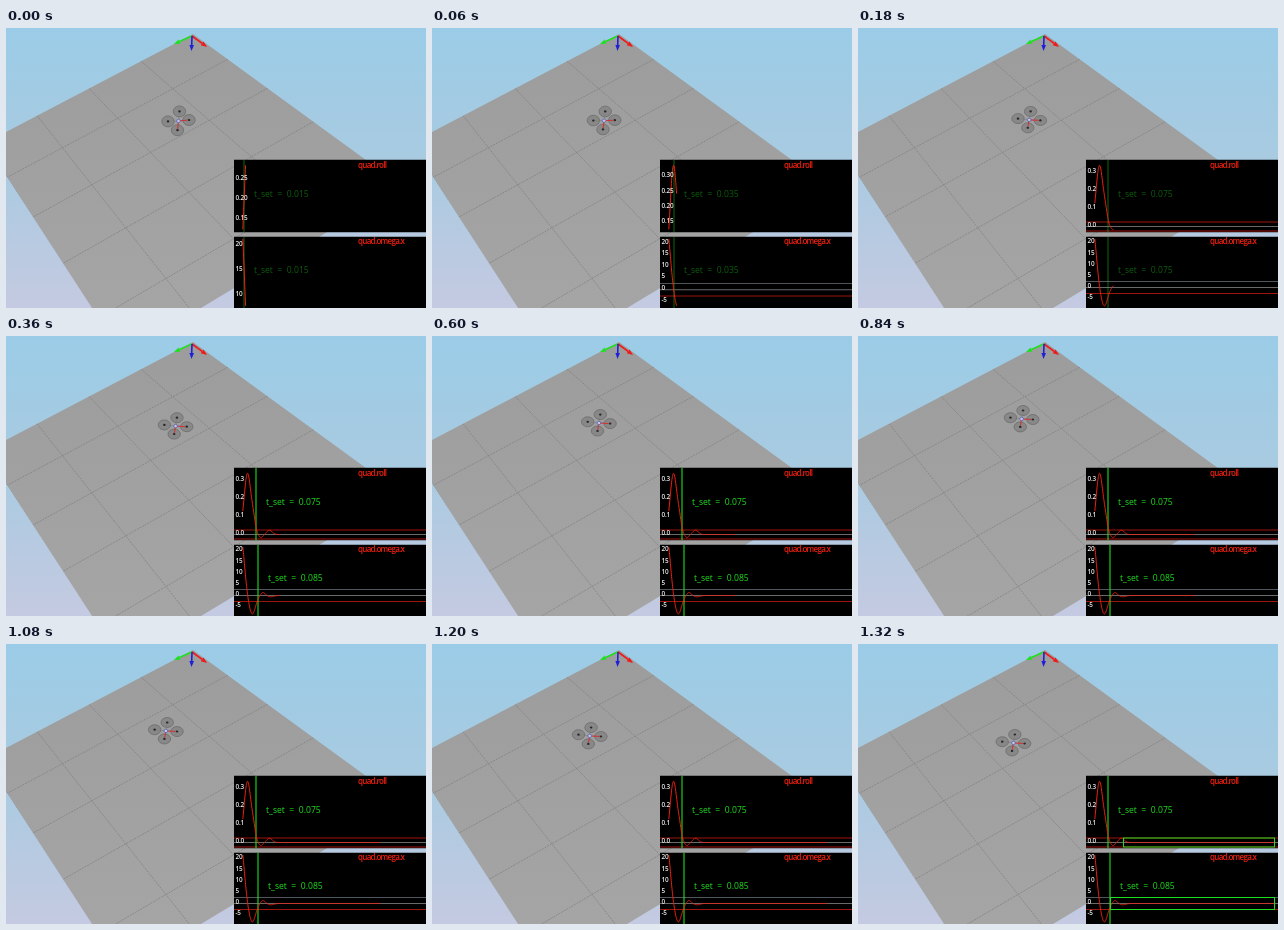
These frames come from a looping animation (420 by 280 pixels, 1.38 s). An HTML page with a canvas:

```html
<!DOCTYPE html>
<html lang="en">
<head>
<meta charset="utf-8">
<title>Quadcopter step response</title>
<style>
html, body { margin: 0; width: 100%; height: 100%; overflow: hidden; background: #a9cde2; }
canvas { display: block; width: 420px; height: 280px; }
</style>
</head>
<body>
<canvas id="stage" width="420" height="280"></canvas>
<script>
const ctx = document.getElementById('stage').getContext('2d');
const STEP = 60, COUNT = 23;
const LEFT = 228, START = 236.8, END = 420;
const GREEN = '#1fe01f', RED = '#f02010';

// A response is a sum of bumps [x, width, height in pixels].
// ticks: [step, digits] when zoomed in, then at full range.
const plots = [
  { title: 'quad.roll', y: 131.5, h: 73, titleY: 139.5, textY: 168.5, settle: .075,
    mid: 198.5, zero: 1.5, unit: 180, ticks: [[.05, 2], [.1, 1]], band: 4.5, upper: '#b01810', boxX: 265.5,
    bumps: [[241.5, 4.8, 61], [247.5, 3, 11], [255, 3, -3], [263.5, 3.8, 4.3]] },
  { title: 'quad.omega.x', y: 208.5, h: 71.5, titleY: 215.5, textY: 244.5, settle: .085,
    mid: 259.5, zero: 2, unit: 2.22, ticks: [[5, 0], [5, 0]], band: 6, upper: '#586068', boxX: 252.5,
    bumps: [[235, 4.6, 57], [246.3, 4.6, -18.5], [257, 3, 3], [265, 4, -1.3]] }
];

const response = (p, x) => p.bumps.reduce((sum, [at, w, h]) => sum + h * Math.exp(-(((x - at) / w) ** 2)), 0);

function sample(p, end) {
  const pts = [];
  for (let x = START; x <= end; x += .2) pts.push([x, response(p, x)]);
  const values = pts.map(q => q[1]);
  return { pts, lo: Math.min(...values), hi: Math.max(...values) };
}

function line(color, width, ...pts) {
  ctx.strokeStyle = color;
  ctx.lineWidth = width;
  ctx.beginPath();
  pts.forEach(([x, y]) => ctx.lineTo(x, y));
  ctx.stroke();
}

function trace(...pts) {
  ctx.beginPath();
  pts.forEach(([x, y]) => ctx.lineTo(x, y));
  ctx.closePath();
}

function text(str, x, y, color, font, letter = 0, word = 0) {
  ctx.font = font + ' "Open Sans", sans-serif';
  ctx.letterSpacing = letter + 'px';
  ctx.wordSpacing = word + 'px';
  ctx.fillStyle = color;
  ctx.fillText(str, x, y);
}

function disc(x, y, rx, ry, fill, stroke) {
  ctx.beginPath();
  ctx.ellipse(x, y, rx, ry, 0, 0, 7);
  ctx.fillStyle = fill;
  ctx.fill();
  if (stroke) {
    ctx.strokeStyle = stroke;
    ctx.lineWidth = .8;
    ctx.stroke();
  }
}

function fade(...colors) {
  const g = ctx.createLinearGradient(0, 0, 0, 280);
  colors.forEach((c, i) => g.addColorStop(i / (colors.length - 1), c));
  return g;
}

function arrow(color, dx, dy) {
  const x = 186, y = 8, len = Math.hypot(dx, dy), ux = dx / len, uy = dy / len;
  const ex = x + dx, ey = y + dy, bx = ex - ux * 6, by = ey - uy * 6;
  line(color, 1.6, [x, y], [bx, by]);
  trace([ex, ey], [bx - uy * 2.3, by + ux * 2.3], [bx + uy * 2.3, by - ux * 2.3]);
  ctx.fillStyle = color;
  ctx.fill();
}

// Line from a vanishing point through (x, y), long enough to cross the ground.
function ray([vx, vy], x, y) {
  const s = 700 / Math.hypot(x - vx, y - vy), dx = (x - vx) * s, dy = (y - vy) * s;
  line('#828282', .8, [x, y], [x + dx, y + dy]);
}

function scene() {
  ctx.fillStyle = fade('#9bcce7', '#a2cbe3', '#a9cbe1', '#b7cae1', '#c4cae1');
  ctx.fillRect(0, 0, 420, 280);
  const top = [187, 6], near = [-332, -371], far = [3810, -1889];
  ctx.save();
  trace(top, [397, 159], [318, 206], [190, 283], [88, 283], [-21, 115]);
  ctx.fillStyle = fade('#9c9c9c', '#a5a5a5');
  ctx.fill();
  ctx.clip();
  ctx.setLineDash([2, 1]);
  for (let i = 1; i < 5; i++) {
    ray(near, top[0] - 52 * i, top[1] + 27.2 * i);
    const x = near[0] + 1 / (1 / (top[0] - near[0]) - i * .000121);
    ray(far, x, top[1] + (x - top[0]) * .727);
  }
  ctx.restore();
  arrow('#20e020', -18, 8);
  arrow('#f01818', 15, 11);
  arrow('#2020d8', -.5, 15);
}

function drone(k) {
  const climb = Math.min(k, 14), x = 172.5 - .38 * k - .018 * k * k;
  const y = 93 - .3 * climb - .03 * climb ** 2 + .25 * (k - climb) ** 2;
  const tilt = Math.max(0, 1 - k / 3);
  const right = [11.2 - .7 * tilt, .6 - 1.6 * tilt], front = [-1.4 + .4 * tilt, 8 + 1.2 * tilt];
  const arms = [right, front, [-right[0], -right[1] - .6], [-front[0], -front[1] - .4]];
  arms.forEach(([dx, dy]) => {
    line('#858585', .8, [x, y], [x + dx, y + dy]);
    disc(x + dx, y + dy, 6.2, 5 + .5 * tilt, 'rgba(128,128,128,.75)', '#6c6c6c');
    disc(x + dx, y + dy, 1.3, 1.1, '#2a2a2a');
  });
  [right, front].forEach(([dx, dy]) => line('#d83030', 1, [x, y], [x + dx * .85, y + dy * .85]));
  disc(x, y, 1.8, 1.7, '#c4c8e4', '#5a64b4');
}

function plot(p, k) {
  const full = sample(p, END), shown = sample(p, 239.6 + 4.9 * k + .144 * k * k);
  const zoom = (full.hi - full.lo) / (shown.hi - shown.lo);
  const toY = v => p.mid - full.lo - (v - shown.lo) * zoom;
  const set = Math.min(p.settle, .015 + .02 * k), x = 235 + 200 * set;
  const across = (color, v) => line(color, .9, [LEFT, toY(v)], [END, toY(v)]);
  ctx.save();
  ctx.beginPath();
  ctx.rect(LEFT, p.y, END - LEFT, p.h);
  ctx.clip();
  ctx.fillStyle = '#000';
  ctx.fillRect(LEFT, p.y, END - LEFT, p.h);

  across('#777', 0);
  across(p.upper, p.band);
  across('#b01810', -p.band);

  ctx.globalAlpha = Math.min(1, .42 + Math.max(0, k - 3) * .2);
  line(GREEN, 1.1, [x, p.y], [x, p.y + p.h]);
  text('t_set = ' + set.toFixed(3), x + 10, p.textY, GREEN, '500 8.6px', 0, 2.3);
  ctx.globalAlpha = 1;

  line(RED, 1, ...shown.pts.map(([px, v]) => [px, toY(v)]));

  const [tick, digits] = p.ticks[zoom > 1.5 ? 0 : 1];
  for (let n = -1; n < 8; n++) {
    const y = toY(n * tick * p.unit + p.zero);
    if (y > p.y + 3 && y < p.y + p.h - 3)
      text((n * tick).toFixed(digits), 229.5, y + 2.3, '#eee', '600 6.4px', -.2);
  }
  text(p.title, 352, p.titleY, RED, '600 8px', -.7);

  if (k === COUNT - 1) {
    ctx.strokeStyle = GREEN;
    ctx.lineWidth = 1;
    ctx.strokeRect(p.boxX, toY(p.band), 416.5 - p.boxX, 2 * p.band);
  }
  ctx.restore();
}

function draw(now) {
  const k = Math.floor(Math.max(0, now - start) / STEP) % COUNT;
  scene();
  drone(k);
  plots.forEach(p => plot(p, k));
  requestAnimationFrame(draw);
}

const start = performance.now();
draw(start);
</script>
</body>
</html>
```
